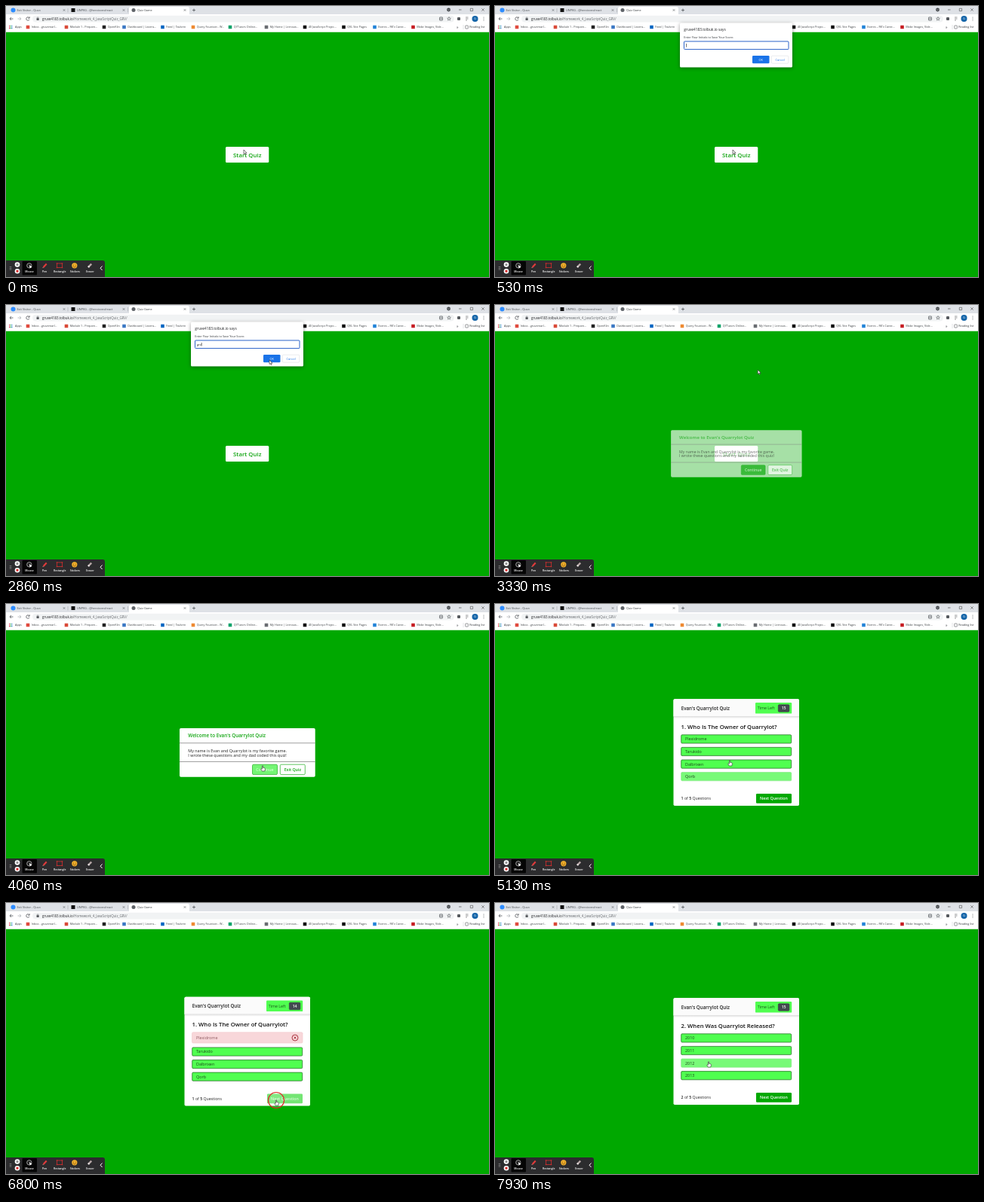
An HTML page with a canvas for the animation above (8 s loop, 640x360 px).

```html
<!DOCTYPE html>
<html lang="en">
<head>
<meta charset="utf-8">
<title>Quiz Game</title>
<style>
  html, body { margin: 0; width: 100%; height: 100%; overflow: hidden; background: #00a800; }
  canvas { display: block; width: 640px; height: 360px; }
</style>
</head>
<body>
<canvas id="stage"></canvas>
<script>
const canvas = document.getElementById('stage');
const c = canvas.getContext('2d');
const ratio = window.devicePixelRatio || 1;
canvas.width = 640 * ratio;
canvas.height = 360 * ratio;

const LOOP = 8000;
const GREEN = '#00a800', LIME = '#50ff50', PALE = '#78fa78', INK = '#222';
const SANS = '"Open Sans", "Noto Sans", sans-serif';
const PROMPT_OPEN = 400, PROMPT_CLOSE = 3150;
const QUIZ_OPEN = 4300, TICK = 5800, ANSWERED = 5950, NEXT = 6920;
const KEYS = [1900, 2200, 2500];
const INITIALS = 'grv';
const HOST = 'gruve4183.tolbuk.io';

// time, x, y of the pointer tip
const PATH = [
  [0, 315, 191], [550, 315, 191], [1250, 349, 73], [3200, 349, 73],
  [3900, 340, 215], [4350, 340, 215], [4850, 316, 230], [5130, 311, 208],
  [5650, 280, 179], [6050, 280, 179], [6620, 358, 262], [6980, 358, 262],
  [7650, 283, 211], [8000, 283, 211]
];
const CLICKS = [300, 4220, 5900, 6770];

const QUESTIONS = [
  { title: '1. Who Is The Owner of Quarrylot?', options: ['Plexidrome', 'Tarukido', 'Dalbrixen', 'Qorb'] },
  { title: '2. When Was Quarrylot Released?', options: ['2010', '2011', '2012', '2013'] }
];

const clamp = v => Math.max(0, Math.min(1, v));
const ease = v => v * v * (3 - 2 * v);
const between = (t, a, b) => t >= a && t < b;

function text(str, x, y, size, color = INK, weight = 400, align = 'left') {
  c.font = `${weight} ${size}px ${SANS}`;
  c.textAlign = align;
  c.textBaseline = 'alphabetic';
  c.fillStyle = color;
  c.fillText(str, x, y + size * 0.36);
  return c.measureText(str).width;
}

function box(x, y, w, h, fill, r = 0, stroke, line = 0.6) {
  c.beginPath();
  c.roundRect(x, y, w, h, r);
  if (fill) { c.fillStyle = fill; c.fill(); }
  if (stroke) { c.strokeStyle = stroke; c.lineWidth = line; c.stroke(); }
}

function dot(x, y, r, fill, stroke, line = 0.6) {
  c.beginPath();
  c.arc(x, y, r, 0, Math.PI * 2);
  if (fill) { c.fillStyle = fill; c.fill(); }
  if (stroke) { c.strokeStyle = stroke; c.lineWidth = line; c.stroke(); }
}

function lines(color, width, ...paths) {
  c.strokeStyle = color;
  c.lineWidth = width;
  c.beginPath();
  for (const p of paths)
    for (let i = 0; i < p.length; i += 2) c[i ? 'lineTo' : 'moveTo'](p[i], p[i + 1]);
  c.stroke();
}

function cross(x, y, r, color, width = 0.6) {
  lines(color, width, [x - r, y - r, x + r, y + r], [x + r, y - r, x - r, y + r]);
}

function shadowed(x, y, w, h, fill, r, blur, alpha) {
  c.save();
  c.shadowColor = `rgba(0,0,0,${alpha})`;
  c.shadowBlur = blur * ratio;
  c.shadowOffsetY = ratio;
  box(x, y, w, h, fill, r);
  c.restore();
}

function drawTabs() {
  box(0, 0, 640, 12, '#dee1e6');
  box(163, 1, 80, 12, '#fff', 2.5);
  dot(9.5, 5.5, 3, '#2d8cff');
  text('Exit Visitor - Quvo', 14.5, 5.5, 3.8, '#45494d');
  box(86.5, 3, 5, 5, '#111');
  text('UNPKG - @heroicons/react', 94, 5.5, 3.8, '#45494d');
  dot(169, 5.5, 2.5, '#5f6368');
  text('Quiz Game', 174, 5.5, 3.8, '#303438');
  for (const x of [77, 156, 237]) cross(x, 5.5, 1.3, '#55595d');
  lines('#9a9da2', 0.5, [82, 3, 82, 8.5], [161.5, 3, 161.5, 8.5]);
  lines('#44484c', 0.7, [247, 5.5, 251, 5.5], [249, 3.5, 249, 7.5]);
  dot(586.5, 5, 2.4, '#44484c');
  lines('#dee1e6', 0.6, [585.3, 4.5, 586.5, 5.7, 587.7, 4.5]);
  lines('#333', 0.6, [600, 5, 603.5, 5]);
  box(615.3, 3.3, 3.3, 3.3, null, 0, '#333', 0.5);
  cross(632, 5, 1.7, '#333', 0.5);
}

function drawAddressBar() {
  box(0, 11, 640, 23.7, '#fff');
  box(35, 12.7, 559, 8.8, '#f1f3f4', 4.4);
  lines('#55595d', 0.8, [9.5, 17, 5, 17], [7, 15, 5, 17, 7, 19]);
  lines('#b0b4b8', 0.8, [15.5, 17, 20, 17], [18, 15, 20, 17, 18, 19]);
  c.beginPath();
  c.arc(29, 17, 2.2, 0.4, 5.6);
  c.strokeStyle = '#55595d';
  c.lineWidth = 0.8;
  c.stroke();
  lines('#55595d', 0.8, [31.2, 14.2, 31.2, 16.2, 29.2, 16.2]);
  box(40.5, 16.3, 3.2, 2.7, '#55595d', 0.4);
  box(41.2, 14.8, 1.8, 2.2, null, 0.9, '#55595d', 0.5);
  const w = text(HOST, 48, 17, 4.4, '#202124');
  text('/Homework_4_JavaScriptQuiz_GRV/', 48 + w, 17, 4.4, '#62666a');
  box(574.5, 15, 4, 4, null, 0.5, '#55595d', 0.8);
  box(575.8, 16.3, 1.4, 1.4, '#55595d');
  c.beginPath();
  for (let i = 0; i < 10; i++) {
    const a = -Math.PI / 2 + i * Math.PI / 5, r = i % 2 ? 1.1 : 2.5;
    c.lineTo(587 + Math.cos(a) * r, 17 + Math.sin(a) * r);
  }
  c.closePath();
  c.strokeStyle = '#55595d';
  c.lineWidth = 0.6;
  c.stroke();
  box(598, 15, 4, 4, '#55595d', 1);
  lines('#55595d', 0.6, [609, 15, 612.5, 15], [609, 17, 612.5, 17], [609, 19, 611, 19]);
  dot(621.5, 17, 4, '#1565a8');
  text('G', 621.5, 17, 4, '#fff', 400, 'center');
  for (const y of [15, 17, 19]) dot(633, y, 0.5, '#55595d');
}

function drawBookmarks() {
  const items = [
    [29, '#e04b3f', 'Inbox - gruvemarl...'], [80, '#d94a38', 'Module 1 - Prepare...'],
    [130, '#222', 'OpenKiln'], [156.5, '#3b78c4', 'Dashboard | Learns...'],
    [207.5, '#0a66c2', 'Feed | Tavlorin'], [248, '#ee8a32', 'Query Fountain - W...'],
    [297, '#12a36a', 'Q7Tutors Online...'], [345, '#6a6d72', 'My Home | Lernova...'],
    [396, '#111', '40 JavaScript Projec...'], [447.5, '#111', 'QVL Site Pages'],
    [488.5, '#2384d8', "Events \u2013 RK's Caree..."], [539.5, '#c61d22', 'Make Images, Vide...']
  ];
  for (let i = 0; i < 9; i++)
    box(4 + (i % 3) * 1.7, 25.7 + Math.floor(i / 3) * 1.7, 1.1, 1.1, ['#e24', '#2a4', '#38d'][i % 3]);
  text('Apps', 12, 28, 3.8, '#3c4043');
  for (const [x, color, label] of items) {
    box(x - 2.3, 25.7, 4.6, 4.6, color, 0.4);
    text(label, x + 4.7, 28, 3.75, '#3c4043');
  }
  text('\u00bb', 597, 27.7, 5, '#3c4043');
  lines('#c5c8cc', 0.5, [606, 25, 606, 31]);
  box(608.8, 26, 3.5, 4, null, 0.4, '#55595d', 0.6);
  text('Reading list', 614.3, 28, 3.75, '#303438');
}

function drawToolbar() {
  box(0, 338, 131, 23, '#2c2c2e', [0, 3, 0, 0]);
  box(21.5, 339, 19.5, 18.5, '#050505', 1);
  for (let i = 0; i < 6; i++) dot(5.2 + (i % 2) * 1.6, 346.5 + Math.floor(i / 2) * 1.8, 0.5, '#aaa');
  dot(15, 343.6, 3.3, '#fff');
  lines('#333', 0.8, [14.2, 342.2, 14.2, 345], [15.8, 342.2, 15.8, 345]);
  dot(15, 352.2, 3.3, '#fff');
  box(13.5, 350.7, 3, 3, '#d62b2b', 0.4);

  dot(30.8, 344.8, 3.2, '#222', '#cfcfcf', 0.7);
  c.beginPath();
  c.moveTo(30.8, 344);
  c.lineTo(34.5, 346.8);
  c.lineTo(31.6, 348.6);
  c.fillStyle = '#fff';
  c.fill();
  lines('#e23b3b', 2.1, [49.6, 347, 53.7, 342.5]);
  lines('#ffb0a8', 0.8, [48.6, 348, 49.5, 347]);
  box(67.5, 342, 7, 5.5, null, 0.3, '#d22f2f', 0.8);
  for (const x of [67.5, 74.5])
    for (const y of [342, 347.5]) box(x - 0.7, y - 0.7, 1.4, 1.4, '#d22f2f');
  dot(90.8, 344.8, 3.6, '#f5b32b');
  dot(89.5, 344, 0.5, '#5c3510');
  dot(92.1, 344, 0.5, '#5c3510');
  c.beginPath();
  c.arc(90.8, 345, 1.9, 0.2, Math.PI - 0.2);
  c.strokeStyle = '#5c3510';
  c.lineWidth = 0.6;
  c.stroke();
  lines('#b9a9a9', 2.4, [109, 347, 113.2, 342.7]);
  lines('#e6e0e0', 2.4, [109, 347, 110.3, 345.7]);
  ['Mouse', 'Pen', 'Rectangle', 'Stickers', 'Eraser'].forEach((label, i) =>
    text(label, 31 + i * 20.1, 352.4, 3.5, '#fff', 600, 'center'));
  lines('#fff', 1, [127.5, 345.5, 125, 348.2, 127.5, 351]);
}

function drawPrompt(t) {
  shadowed(245, 22.5, 149, 59, '#fff', 1.5, 5, 0.4);
  text(HOST + ' says', 250.3, 31.5, 4.8, '#202124');
  text('Enter Your Initials to Save Your Score:', 250.3, 41.2, 3.8, '#303438');
  box(250.5, 47, 138.5, 10.6, '#fff', 1, '#2a62c8', 1);
  const typed = INITIALS.slice(0, KEYS.filter(k => t >= k).length);
  const w = text(typed, 253, 52.3, 3.9, '#222');
  const since = t - Math.max(PROMPT_OPEN, ...KEYS.filter(k => t >= k));
  if (since % 1000 < 500) lines('#111', 0.6, [253.5 + w, 50, 253.5 + w, 54.6]);
  box(341, 66, 22.5, 10.3, '#1a73e8', 1.3);
  text('OK', 352.2, 71.2, 3.9, '#fff', 400, 'center');
  box(366.3, 66.2, 22.5, 10, '#fff', 1.3, '#d5d8dd', 0.5);
  text('Cancel', 377.6, 71.2, 3.9, '#1a73e8', 400, 'center');
}

function button(x, y, w, h, label, hover) {
  box(x, y, w, h, hover ? '#74e574' : GREEN, 1.2);
  text(label, x + w / 2, y + h / 2, 5.3, hover ? '#d8fbd8' : '#fff', 600, 'center');
}

// Fades and grows a panel about the page centre
function panel(amount, draw) {
  if (amount <= 0) return;
  const s = 0.9 + 0.1 * amount;
  c.save();
  c.globalAlpha = amount;
  c.translate(320, 197.5);
  c.scale(s, s);
  c.translate(-320, -197.5);
  draw();
  c.restore();
}

function drawWelcome(t) {
  box(230, 165, 179.7, 64.8, '#fff', 1.7);
  text("Welcome to Evan's Quarrylot Quiz", 241.3, 175, 6.3, '#10a510', 600);
  lines('#777', 0.7, [230, 184.7, 409.7, 184.7], [230, 209.5, 409.7, 209.5]);
  text('My name is Evan and Quarrylot is my favorite game.', 241.3, 194.8, 5.4);
  text('I wrote these questions and my dad coded this quiz!', 241.3, 200.6, 5.4);
  const hover = t >= 3820;
  box(326.5, 213.2, 33, 13.4, hover ? '#74f574' : GREEN, 1.5, '#1fae1f', 0.7);
  text('Continue', 343, 220, 5.3, hover ? '#d0ffd0' : '#fff', 600, 'center');
  box(363.3, 213.2, 33, 13.4, '#fff', 1.5, '#1fae1f', 0.7);
  text('Exit Quiz', 379.8, 220, 5.3, '#10a510', 600, 'center');
}

function hoveredOption(t) {
  if (between(t, 4700, 5160)) return 3;
  if (between(t, 5160, 5300)) return 2;
  if (between(t, 5300, 5500)) return 1;
  if (between(t, 5500, ANSWERED)) return 0;
  return t >= 7450 ? 2 : -1;
}

function drawQuiz(t) {
  const second = t >= NEXT;
  const wrong = between(t, ANSWERED, NEXT);
  const shift = wrong ? 1.5 : 0;
  const { title, options } = QUESTIONS[second ? 1 : 0];
  const top = 126.3 - shift;
  const hover = hoveredOption(t);

  box(236.5, top, 166.5, 141.7 + shift * 2, '#fff', 1.7);
  box(236.5, top, 166.5, 23.2, '#fbfbfb', [1.7, 1.7, 0, 0]);
  const shade = c.createLinearGradient(0, top + 22.5, 0, top + 26);
  shade.addColorStop(0, 'rgba(0,0,0,.14)');
  shade.addColorStop(1, 'rgba(0,0,0,0)');
  box(236.5, top + 22.8, 166.5, 3.2, shade);

  text("Evan's Quarrylot Quiz", 246.7, 138.6 - shift, 6.2, INK, 600);
  box(345, 131 - shift, 48.2, 14.6, LIME, 1.2);
  text('Time Left', 347.8, 138.4 - shift, 5.3, '#185018');
  box(375.3, 133.8 - shift, 14.6, 9.4, '#434a50', 1.2, '#343a40');
  text(between(t, TICK, NEXT) ? '14' : '15', 382.6, 138.5 - shift, 5.2, '#fff', 600, 'center');
  text(title, 246.6, 162.8 - shift, 7.7, '#111', 600);

  options.forEach((label, i) => {
    const y = 179.4 + i * 16.6 + (wrong && i ? shift : 0);
    if (wrong && i === 0) {
      box(246.5, 171.8, 146.5, 14.2, '#f8d7da', 1.5, '#f1c6ca', 0.6);
      text(label, 252, 179, 5.4, '#8d5a60');
      dot(383, 179, 4, null, '#a42834', 0.9);
      cross(383, 179, 1.5, '#a42834', 0.9);
      return;
    }
    const over = hover === i;
    box(246.7, y - 5.6, 146, 11.2, over ? PALE : LIME, 1.3, over ? '#84e884' : '#1d641d', 0.7);
    text(label, 252, y, 5.4, '#1c401c');
  });

  let x = 246.6;
  const y = 258.5 + shift;
  for (const [part, weight] of [[second ? '2' : '1', 600], [' of ', 400], ['5', 600], [' Questions', 400]])
    x += text(part, x, y, 5.2, INK, weight);
  button(346, 252 + shift, 47, 12.8, 'Next Question', between(t, 6500, 7050));
}

function pointerAt(t) {
  let i = 1;
  while (i < PATH.length - 1 && t > PATH[i][0]) i++;
  const [t0, x0, y0] = PATH[i - 1], [t1, x1, y1] = PATH[i];
  const k = ease(clamp((t - t0) / (t1 - t0)));
  return [x0 + (x1 - x0) * k, y0 + (y1 - y0) * k];
}

function drawPointer(t) {
  const [x, y] = pointerAt(t);
  const click = CLICKS.find(k => Math.abs(t - k) < 130);
  if (click !== undefined) dot(x, y, 10.5, 'rgba(255,255,255,.12)', '#e02828', 1.2);
  c.save();
  c.translate(x, y);
  c.lineJoin = 'round';
  const outline = t < 3600
    ? 'M0 0V5.6L1.3 4.5L2.2 6.5L3.1 6.1L2.2 4.2H4Z'
    : 'M-.6 0Q0-.7.6 0V2.5L2.5 2.8Q3.6 3.1 3.4 4.3L2.8 7H-.7L-2.3 4.4Q-2.2 3.3-.6 4.3Z';
  const shape = new Path2D(outline);
  c.fillStyle = '#fff';
  c.fill(shape);
  c.strokeStyle = '#333';
  c.lineWidth = 0.65;
  c.stroke(shape);
  c.restore();
}

function draw(t) {
  c.setTransform(ratio, 0, 0, ratio, 0, 0);
  box(0, 0, 640, 360, GREEN);
  drawTabs();
  drawAddressBar();
  drawBookmarks();
  box(291, 187, 57.3, 21, '#fff', 1.5);
  text('Start Quiz', 319.7, 197.8, 7.8, '#10a510', 600, 'center');
  const welcome = ease(clamp((t - PROMPT_CLOSE) / 300));
  const quiz = ease(clamp((t - QUIZ_OPEN) / 300));
  if (quiz < 1) panel(welcome * (1 - quiz), () => drawWelcome(t));
  panel(quiz, () => drawQuiz(t));
  if (between(t, PROMPT_OPEN, PROMPT_CLOSE)) drawPrompt(t);
  drawToolbar();
  drawPointer(t);
}

const start = performance.now();
function frame() {
  draw((performance.now() - start) % LOOP);
  requestAnimationFrame(frame);
}
frame();
</script>
</body>
</html>
```
